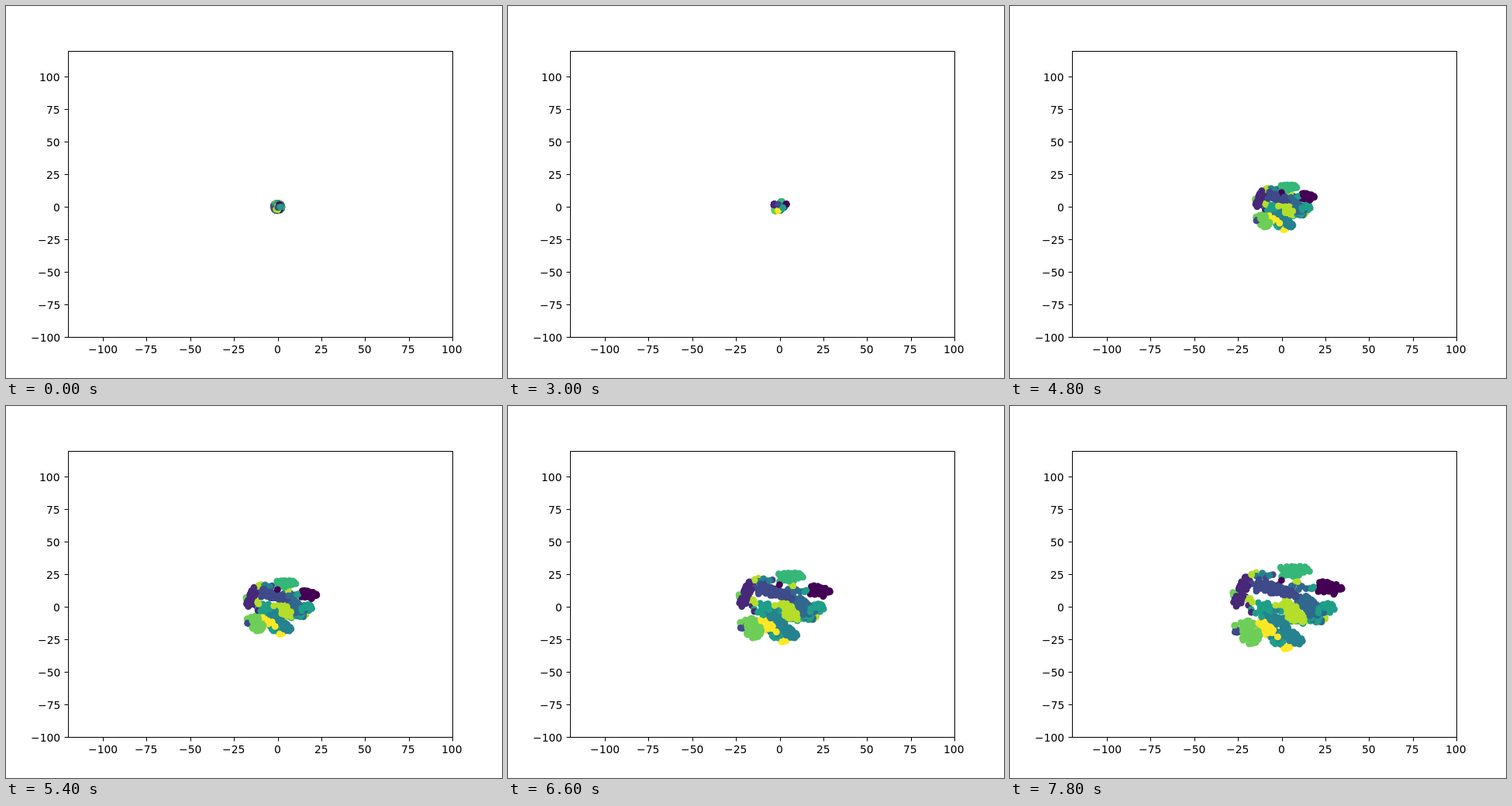
Animation of 640 by 480 pixels, one loop 8000 ms. Source, as an HTML page with a canvas:

```html
<!DOCTYPE html>
<html lang="en">
<head>
<meta charset="utf-8">
<style>
  html, body { margin: 0; width: 100%; height: 100%; overflow: hidden; background: #fff; }
  canvas { display: block; }
</style>
</head>
<body>
<canvas id="plot" width="640" height="480"></canvas>
<script>
const ctx = document.getElementById('plot').getContext('2d');
const LOOP = 8000, STEP = 300, RADIUS = 4.4, LAST = 26;
const RELEASE = 10; // step at which the compressed cloud starts to expand
const BOX = { left: 80, top: 58, right: 576, bottom: 427 };
const px = x => 80 + (x + 120) * 496 / 220;
const py = y => 427.2 - (y + 100) * 369.6 / 220;

const COLORS = ['#440154', '#482878', '#3e4a89', '#31688e', '#26828e',
                '#1f9e89', '#35b779', '#6ece58', '#b5de2b', '#fde725'];

let seed = 20117;
function rand() {
  seed = (seed * 1664525 + 1013904223) % 4294967296;
  return seed / 4294967296;
}
function disk(r) {
  const a = rand() * Math.PI * 2, d = Math.sqrt(rand()) * r;
  return [Math.cos(a) * d, Math.sin(a) * d];
}

// Fills a capsule of radius r between two data points
const points = [];
function cluster(cls, r, x1, y1, x2, y2, density = 0.4) {
  const area = Math.PI * r * r + 2 * r * Math.hypot(x2 - x1, y2 - y1);
  for (let n = Math.ceil(area * density); n > 0; n--) {
    const t = rand(), [dx, dy] = disk(r), [sx, sy] = disk(1);
    points.push({
      cls,
      home: [x1 + (x2 - x1) * t + dx, y1 + (y2 - y1) * t + dy],
      start: [sx * 2.4, sy * 2.9]
    });
  }
}

cluster(0, 4.5, 22, 15.5, 30.5, 13.5);
cluster(1, 2.6, -20, 23, -26, 1);
cluster(2, 3.7, -14, 15.5, 0, 13);
cluster(2, 3.2, 0, 13, 7.5, 8);
cluster(3, 4.8, 12.5, 6, 23, -9);
cluster(4, 3.6, 3, -19.5, 9.5, -27);
cluster(4, 3, -7, -7, 1, -12);
cluster(5, 2.8, -11.5, 2, -8, 0);
cluster(5, 4, 19, -3, 28, 0);
cluster(6, 4.2, 0.5, 27, 12, 28);
cluster(7, 5.5, -20, -13, -16.5, -26);
cluster(8, 5, 0, 2, 11, -9);
cluster(9, 3.6, -12.5, -13.5, -4, -22);
cluster(9, 1.2, 0, -31, 5, -31.5);

// Sparse points between the clusters
const SPARSE = 0.045;
cluster(0, 0, 18.5, 25, 18.5, 25);
cluster(0, 0, 18.5, 25, 18.5, 25);
cluster(0, 1.5, -6, 5, 0, 22, SPARSE);
cluster(1, 1.5, -20, 8, -16, -12, SPARSE);
cluster(2, 1.5, -27, -15, -26, -19, 0.3);
cluster(2, 3, -18, 14, -4, 26, SPARSE);
cluster(3, 4, -2, 20, 14, 12, SPARSE);
cluster(4, 7, -8, -4, 2, -25, 0.08);
cluster(4, 2, -17, 23, -5, 26, 0.08);
cluster(5, 6, -14, -4, 22, -8, SPARSE);
cluster(5, 5, -6, -26, 4, -23, 0.06);
cluster(5, 2, 8, 20, 18, 13, SPARSE);
cluster(7, 1, -28, 8, -27, 12, 0.4);
cluster(7, 1, -28, -13, -26, -15, 0.3);
cluster(8, 1, -18, 25, -15, 26, 0.4);
cluster(8, 2, -20, 7, -13, 3, 0.08);
cluster(8, 1.5, 18, -16, 30, -6, 0.07);
cluster(8, 1, 6, 19, 9, 20, 0.2);

for (let i = points.length - 1; i > 0; i--) {
  const j = Math.floor(rand() * (i + 1));
  [points[i], points[j]] = [points[j], points[i]];
}

const centers = COLORS.map((_, cls) => {
  const own = points.filter(p => p.cls === cls);
  return [0, 1].map(i => own.reduce((sum, p) => sum + p.home[i], 0) / own.length);
});

const clamp = v => Math.min(1, Math.max(0, v));
const smooth = v => v * v * (3 - 2 * v);

function drawPoints(n) {
  const sort = smooth(clamp(n / 6));
  const spread = clamp((n - RELEASE) / (LAST - RELEASE)) ** 0.626;
  const hold = clamp((RELEASE + 4 - n) / 4) ** 2;
  for (const { cls, home, start } of points) {
    const [x, y] = home.map((h, i) => {
      const knot = 0.11 * centers[cls][i] + 0.03 * h;
      const early = start[i] + (knot - start[i]) * sort;
      return early * hold + h * spread;
    });
    ctx.fillStyle = COLORS[cls];
    ctx.beginPath();
    ctx.arc(px(x), py(y), RADIUS, 0, Math.PI * 2);
    ctx.fill();
  }
}

function drawAxes() {
  const { left, top, right, bottom } = BOX;
  ctx.fillStyle = '#000';
  for (const y of [top, bottom]) ctx.fillRect(left, y, right - left + 1, 1);
  for (const x of [left, right]) ctx.fillRect(x, top, 1, bottom - top + 1);
  ctx.font = '13.89px "DejaVu Sans", sans-serif';
  for (let v = -100; v <= 100; v += 25) {
    const text = String(v).replace('-', '\u2212');
    const width = ctx.measureText(text).width;
    const x = px(v), y = Math.round(py(v));
    ctx.fillRect(Math.round(x), bottom, 1, 5.5);
    ctx.fillRect(left - 4.5, y, 4.5, 1);
    ctx.fillText(text, Math.floor(x - width / 2), 448);
    ctx.fillText(text, Math.floor(70.3 - width), y + 6);
  }
}

function draw(n) {
  ctx.fillStyle = '#fff';
  ctx.fillRect(0, 0, 640, 480);
  drawPoints(n);
  drawAxes();
}

const begin = performance.now();
let shown = -1;
function tick() {
  const n = Math.floor(((performance.now() - begin) % LOOP) / STEP);
  if (n !== shown) draw(shown = n);
  requestAnimationFrame(tick);
}
tick();
</script>
</body>
</html>
```
